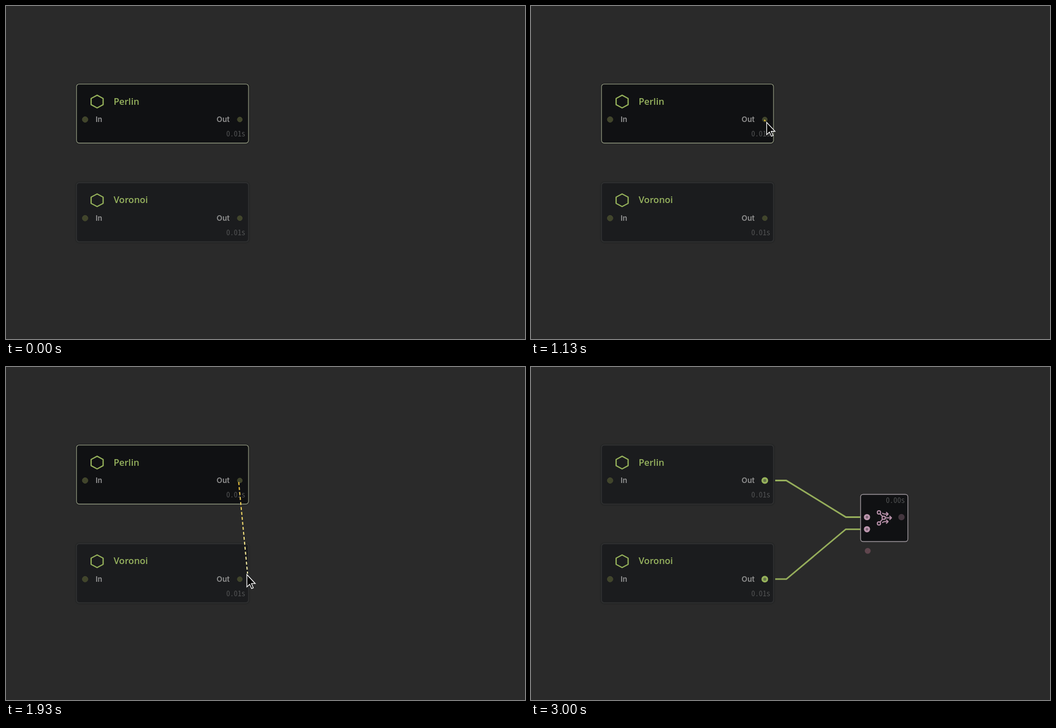
An HTML page for the animation above (4.67 s loop, 933 by 600 pixels).

```html
<!DOCTYPE html>
<html lang="en">
<head>
<meta charset="utf-8">
<title>Node graph</title>
<style>
  html, body { margin: 0; width: 100%; height: 100%; overflow: hidden; background: #2a2a2a; }
  svg { display: block; width: 100%; height: 100%; }
  .title { font: 600 16.4px "Open Sans", "Noto Sans", sans-serif; fill: #97b35f; }
  .label { font: 600 13.5px Inter, sans-serif; fill: #929292; }
  .time { font: 300 13.6px "Noto Sans Mono CJK JP", Roboto, sans-serif; fill: #535455; }
  .end { text-anchor: end; }
  .hex { fill: none; stroke: #97b35b; stroke-width: 2.2; stroke-linejoin: round; }
  .halo { fill: none; stroke: #252626; stroke-width: 3; }
  .box { fill: #1b1c1e; stroke: #303132; stroke-width: 1.6; }
  .selected .box { fill: #101113; stroke: #8b917a; stroke-width: 1.3; }
  .port { fill: #41452b; stroke: #494d31; }
  .linked .out { fill: #66754a; stroke: #97b35b; stroke-width: 3.2; }
  .hover .label.end { fill: #f0f0f0; }
  .hover .out { fill: #3c4329; stroke: #97b35b; stroke-width: 3.2; }
  .wire { fill: none; stroke: #96ae5b; stroke-width: 2.8; stroke-linejoin: round; }
  .merge .box { fill: #101113; stroke: #9b949a; stroke-width: 1.4; }
  .pending .box { stroke-dasharray: 2.2 1.6; }
  .input { fill: #7d6475; stroke: #bd97af; stroke-width: 3.2; }
  .icon { fill: none; stroke: #b891aa; stroke-width: 2; stroke-linecap: round; stroke-linejoin: round; }
  #link { stroke: url(#glow); stroke-width: 2; stroke-dasharray: 5.3 3.7; }
  #cursor { fill: #050505; stroke: #fff; stroke-width: 1.3; stroke-linejoin: miter; }
</style>
</head>
<body>
<svg viewBox="0 0 933 600">
  <defs>
    <linearGradient id="glow" gradientUnits="userSpaceOnUse" x1="0" y1="204" x2="0" y2="380">
      <stop stop-color="#f0c53c"/>
      <stop offset=".45" stop-color="#f6e070"/>
      <stop offset="1" stop-color="#f8f3b8"/>
    </linearGradient>
  </defs>
  <g id="wires">
    <path class="wire" d="M437 204.5H459L566 270.5H592"/>
    <path class="wire" d="M437 382.2H459L566 292.3H592"/>
  </g>
  <g id="perlin"></g>
  <g id="voronoi" transform="translate(0 177.8)"></g>
  <g id="merge">
    <rect class="box" x="592.5" y="229.5" width="85" height="85" rx="4.5"/>
    <text class="time end" x="672" y="244.5">0.00s</text>
    <circle class="input" cx="604" cy="270.5" r="4"/>
    <circle class="input" cx="604" cy="292.3" r="4"/>
    <circle cx="666" cy="270.5" r="5.7" fill="#44363f"/>
    <circle cx="605.3" cy="331.2" r="5.3" fill="#60464e"/>
    <g class="icon">
      <circle cx="625.5" cy="262" r="2.9"/>
      <circle cx="634" cy="271.7" r="2.9"/>
      <circle cx="625.5" cy="281.8" r="2.9"/>
      <path d="M627.5 264.5L632 269.4M627.5 279.4L632 274.2M637.5 271.7H648m-3-3l3 3-3 3"/>
      <path d="M632 263.5Q634 265 636.5 265H642m-3-3l3 3-3 3"/>
      <path d="M632 280.1Q634 278.6 636.5 278.6H642m-3-3l3 3-3 3"/>
    </g>
  </g>
  <line id="link" x1="418" y1="204"/>
  <path id="cursor" d="M0 0V22.3L5 17.6 8.5 25.2 11.6 23.9 8.2 16.2H15.1Z"/>
</svg>
<script>
  const LOOP = 4670, STEP = 1000 / 15;
  const PRESS = 17, HOVER = 31, RELEASE = 38, WIRED = 40, GONE = 45;
  const [perlin, voronoi, merge, wires, link, cursor] =
    ['perlin', 'voronoi', 'merge', 'wires', 'link', 'cursor'].map(id => document.getElementById(id));

  const nodeMarkup = name => `
    <rect class="halo" x="125.5" y="139.5" width="312" height="109" rx="6.5"/>
    <rect class="box" x="126.7" y="140.6" width="309.3" height="106.4" rx="5"/>
    <path class="hex" d="M163.8 160.8L174.6 166.6V177.8L163.8 183.6 153 177.8V166.6Z"/>
    <text class="title" x="193.5" y="177.5">${name}</text>
    <circle class="port" cx="142.2" cy="204.5" r="5"/>
    <circle class="port out" cx="420.3" cy="204.5" r="4.4"/>
    <text class="label" x="161" y="209">In</text>
    <text class="label end" x="402" y="209">Out</text>
    <text class="time end" x="430" y="235">0.01s</text>`;
  perlin.innerHTML = nodeMarkup('Perlin');
  voronoi.innerHTML = nodeMarkup('Voronoi');

  // Drag path: step, x, y
  const drag = [
    [16, 421, 207], [18, 431, 219], [20, 459, 262], [21, 467.5, 286], [22, 468.5, 308],
    [24, 447, 347], [26, 438, 364], [29, 433, 374], [32, 424, 380], [34, 422.5, 381], [40, 422.5, 381.5]
  ];

  const slope = (i, axis) => {
    const before = drag[i - 1], after = drag[i + 1];
    return before && after ? (after[axis] - before[axis]) / (after[0] - before[0]) : 0;
  };

  function dragPoint(step) {
    const time = Math.max(16, Math.min(40, step));
    const i = Math.max(0, drag.findIndex(key => key[0] >= time) - 1);
    const a = drag[i], b = drag[i + 1], span = b[0] - a[0], u = (time - a[0]) / span;
    return [1, 2].map(axis => {
      const ease = u * u * (3 - 2 * u);
      return a[axis] + (b[axis] - a[axis]) * ease
        + span * u * (1 - u) * ((1 - u) * slope(i, axis) - u * slope(i + 1, axis));
    });
  }

  function cursorPoint(step) {
    if (step < 16) {
      const rest = Math.max(0, 1 - step / 13.7) ** 3;
      return [421 + 432 * rest, 207 + 392 * rest];
    }
    const [x, y] = dragPoint(step);
    const leave = Math.max(0, (step - WIRED) / 4) ** 2;
    return [x + 178 * leave, y + 198 * leave];
  }

  const show = (element, visible) => element.setAttribute('visibility', visible ? 'visible' : 'hidden');

  function draw(step) {
    const dragging = step >= PRESS && step < RELEASE;
    const released = step >= RELEASE, wired = step >= WIRED;
    perlin.setAttribute('class', released ? 'linked' : 'selected');
    voronoi.setAttribute('class', released ? 'linked' : step >= HOVER ? 'hover' : '');
    merge.setAttribute('class', wired ? 'merge' : 'merge pending');
    show(merge, released);
    show(wires, wired);
    show(link, dragging);
    show(cursor, step > 0 && step < GONE);

    const [endX, endY] = dragPoint(step - 0.65);
    link.setAttribute('x2', endX);
    link.setAttribute('y2', endY);
    link.setAttribute('stroke-dashoffset', -(1 + (step - 22) * 1.64));
    cursor.setAttribute('transform', `translate(${cursorPoint(step)})`);
  }

  const start = performance.now();
  function tick() {
    const time = (performance.now() - start) % LOOP;
    draw(Math.min(69, Math.floor((time + 4) / STEP)));
    requestAnimationFrame(tick);
  }
  tick();
</script>
</body>
</html>
```
